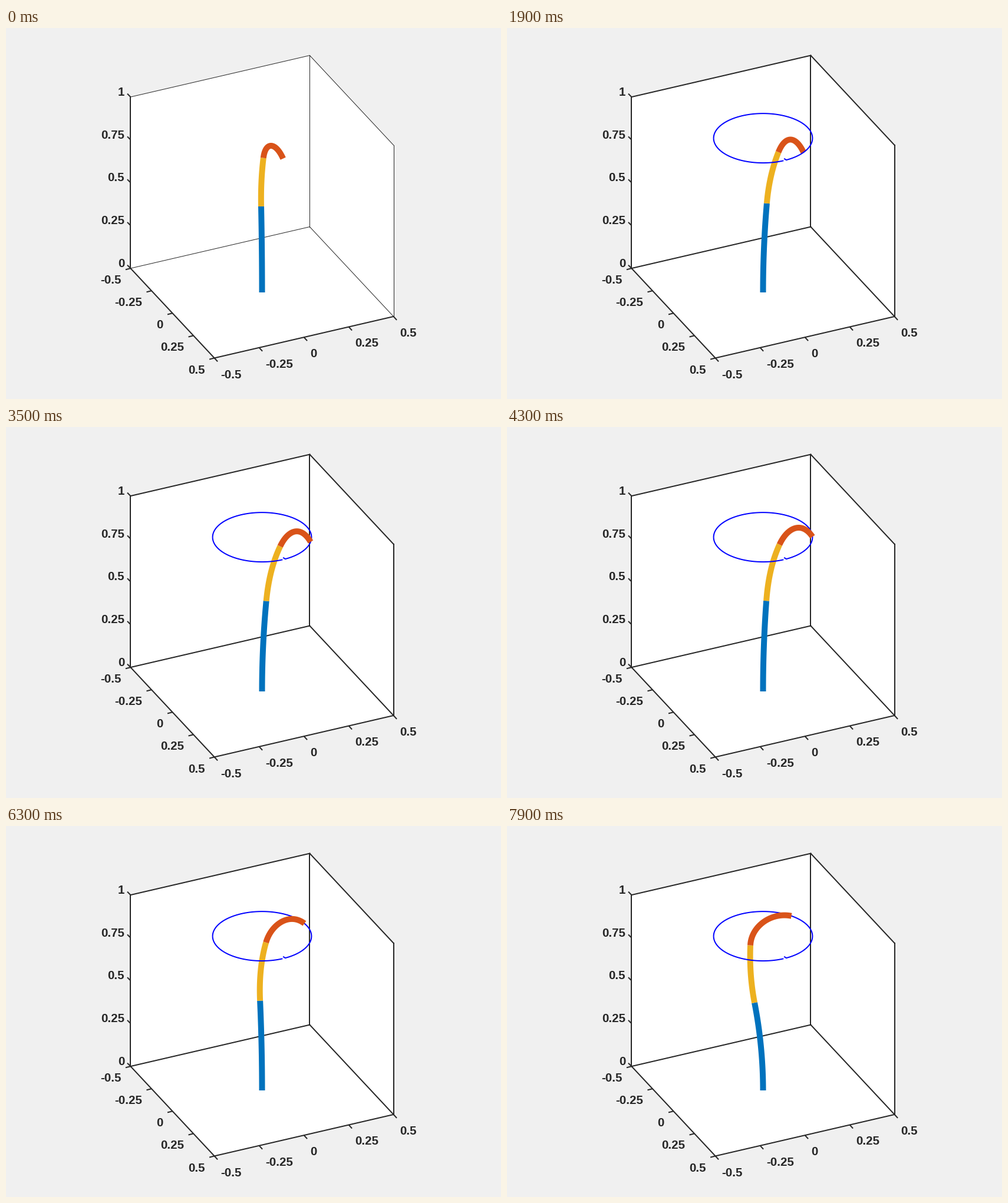
Recreate the animation shown at these times as a matplotlib script. Size 840 px wide and 630 px high, loop 8000 ms.

```python
import numpy as np
import matplotlib.pyplot as plt
from matplotlib.animation import FuncAnimation

W, H, DPI = 840, 630, 100
INK, PAPER = "#262626", "#f0f0f0"
BLUE, GOLD, RUST, TRAIL = "#0072bd", "#edb120", "#d95319", "#0000ff"


def px(n):
    return n * 72 / DPI


plt.rcParams["font.family"] = "Liberation Sans"
fig = plt.figure(figsize=(W / DPI, H / DPI), dpi=DPI, facecolor=PAPER)
ax = fig.add_axes([0, 0, 1, 1])
ax.set_xlim(0, W)
ax.set_ylim(H, 0)
ax.axis("off")

# Orthographic box: pixel steps for one unit along each axis
BASE = np.array([434.5, 449.0])
U = np.array([304.0, -70.5])
V = np.array([142.2, 152.3])
Z = np.array([0.0, -291.0])


def project(u, v, z):
    return BASE + u * U + v * V + z * Z


def stroke(points, width, color=INK, order=2, cap="projecting"):
    line, = ax.plot(*np.array(points).T, color=color, lw=px(width),
                    zorder=order, solid_capstyle=cap,
                    solid_joinstyle="miter")
    return line


left, front, right, back = [project(u, v, 0) for u, v in
                            [(-.5, -.5), (-.5, .5), (.5, .5), (.5, -.5)]]
outline = [left, front, right, right + Z, back + Z, left + Z]
ax.add_patch(plt.Polygon(outline, fc="white", ec="none", zorder=1))

edges = [stroke(path, 1) for path in [(left + Z, back + Z),
                                      (back + Z, right + Z),
                                      (right + Z, right),
                                      (left, back), (back, right),
                                      (back, back + Z)]]
stroke([left + Z, left], 2)
stroke([left, front, right], 2)


def label(x, y, value, side):
    ax.text(x, y, f"{value:g}", ha=side, va="baseline", color=INK,
            fontsize=px(20.5), fontweight="bold", zorder=3)


for f in np.arange(0, 1.1, 0.25):
    for start, step in [(left + f * Z, (-5.5, -5.5)),
                        (left + f * V, (-8.5, 2.2)),
                        (front + f * U, (5.5, 6))]:
        stroke([start, start + step], 2, cap="butt")
    label(201.2, 406 - 291 * f, f, "right")
    label(195.6 + 142.6 * f, 434.2 + 152.4 * f, f - 0.5, "right")
    label(364.2 + 303.6 * f, 595 - 71.5 * f, f - 0.5, "left")

# Circular path of the tip, 3 degrees per step
CENTER = project(0, 0, 0.9)
RADII = 0.25 * np.hypot(U, V)
START = np.array([470.2, 221.7])


def on_path(deg):
    a = np.radians(deg)
    return CENTER + RADII * np.stack([np.cos(a), np.sin(a)], axis=-1)


def arc(a, b):
    return on_path(np.linspace(a, b, 90))


trail = [stroke(arc(22, -180), 2, TRAIL, 4, "butt"),
         stroke(arc(-180, -294.5), 2, TRAIL, 8, "butt"),
         stroke(np.vstack([START, arc(62, 22)]), 2, TRAIL, 8, "butt")]

T = np.linspace(0, 1, 40)[:, None]


def bezier(a, b, c, d):
    return ((1 - T) ** 3 * a + 3 * T * (1 - T) ** 2 * b
            + 3 * T ** 2 * (1 - T) * c + T ** 3 * d)


def unit(v):
    return v / np.hypot(*v)


def section(color, order):
    return stroke([BASE, BASE], 10, color, order, "butt")


lower, middle, upper = section(BLUE, 5), section(GOLD, 6), section(RUST, 7)


def swing(step, peak, at, size, harmonic=1):
    """Cosine sway that reaches its peak value at the given step."""
    return peak - size * (1 - np.cos(np.radians(3 * harmonic * (step - at))))


def pose(step):
    """Two joints, the tip, and the curve handles of the top section."""
    u = step / 40
    j1 = np.array([swing(step, 442, 15.2, 30),
                   swing(step, 295.2, 22.5, -12.5)])
    j2 = np.array([swing(step, 465.5, 16.7, 80),
                   swing(step, 197.4, 29, -14) + swing(step, 0, 29, -5, 2)])
    tip = on_path(65 - 3 * step) if step else START
    h1 = np.array([swing(step, 14.4, 19, 24), -28.5 - 3.6 * u])
    h2 = np.array([12.5 + 22 * u ** 2.5, 28 - 21 * u ** 4])
    return j1, j2, tip, h1, h2


def draw(frame):
    step = (frame + 1) // 2
    for line in edges:
        line.set_linewidth(px(2 if step else 1))
    for line in trail:
        line.set_visible(step > 0)

    j1, j2, tip, h1, h2 = pose(step)
    bend = np.array([BASE[0], (BASE[1] + j1[1]) / 2])
    lower.set_data(*bezier(BASE, BASE + (bend - BASE) * 2 / 3,
                           j1 + (bend - j1) * 2 / 3, j1).T)
    reach = np.hypot(*(j2 - j1)) / 3
    middle.set_data(*bezier(j1, j1 + unit(j1 - bend) * reach,
                            j2 - unit(h1) * reach, j2).T)
    upper.set_data(*bezier(j2, j2 + h1, tip - h2, tip).T)
    return [lower, middle, upper, *edges, *trail]


anim = FuncAnimation(fig, draw, frames=80, interval=100, repeat=True,
                     repeat_delay=0, init_func=lambda: draw(0))
plt.show()
```
